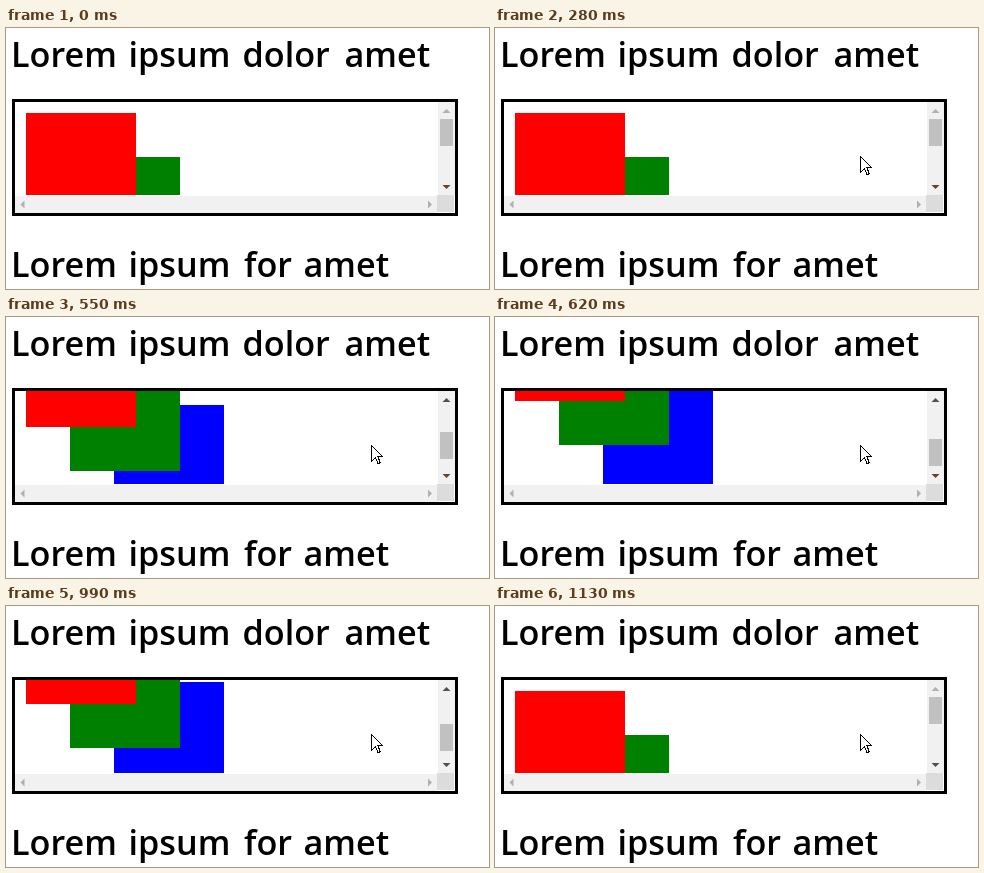
These frames come from a looping animation (483x261 px, 1.36 s). An HTML page:

```html
<!DOCTYPE html>
<html lang="en">
<head>
<meta charset="utf-8">
<style>
  html, body { margin: 0; width: 100%; height: 100%; overflow: hidden; background: #fff; }
  svg { display: block; }
  text { font: 600 34.2px "Open Sans", "Noto Sans", sans-serif; }
  .crisp { shape-rendering: crispEdges; }
</style>
</head>
<body>
<svg width="483" height="261" viewBox="0 0 483 261">
  <defs><clipPath id="view"><rect x="9" y="74" width="423" height="93"/></clipPath></defs>
  <text x="5" y="39">Lorem <tspan x="122.500">ipsum</tspan> <tspan x="236.500">dolor</tspan> <tspan x="338.500">amet</tspan></text>
  <text x="5" y="249">Lorem <tspan x="122.500">ipsum</tspan> <tspan x="238">for</tspan> <tspan x="297.500">amet</tspan></text>
  <g class="crisp">
    <g clip-path="url(#view)">
      <g id="content">
        <rect x="108" y="173" width="110" height="110" fill="blue"/>
        <rect x="64" y="129" width="110" height="110" fill="green"/>
        <rect x="20" y="85" width="110" height="110" fill="red"/>
      </g>
    </g>
    <path d="M432 74h17v93h-17zM9 168h422v17h-422z" fill="#f1f1f1"/>
    <rect x="431" y="167" width="17" height="17" fill="#dcdcdc"/>
    <rect id="thumb" x="434" y="91" width="13" height="27" fill="#c1c1c1"/>
    <rect x="7.5" y="72.5" width="443" height="114" fill="none" stroke="#000" stroke-width="3"/>
  </g>
  <path id="up" d="M436.5 85h8l-4-4z"/>
  <path id="down" d="M436.5 157h8l-4 4z"/>
  <path d="M18.500 172.500v8l-4-4zM422 172.500v8l4-4z" fill="#b0b0b0"/>
  <path id="cursor" class="crisp" d="M.5 .5V16.500L4.500 12.500L7 18.500H8.500L9 17.500L7 11.500H11.500Z" fill="#fff" stroke="#000"/>
</svg>
<script>
const LOOP = 1360, MAX_SCROLL = 116, THUMB_TRAVEL = 33;
// Each row: start time in ms, then the values held until the next row
const scrollSteps = [[0, 0], [490, 23], [550, 85], [620, 111], [690, 116], [990, 97], [1060, 30], [1130, 0]];
const cursorSteps = [[0, -50, -50], [70, 442, 224], [140, 402, 174], [210, 372, 137], [280, 365, 128]];

const $ = id => document.getElementById(id);
const held = (steps, t) => steps.findLast(step => step[0] <= t).slice(1);
const move = (id, x, y) => $(id).setAttribute('transform', `translate(${x} ${y})`);
const tint = (id, color) => $(id).setAttribute('fill', color);

function draw(now) {
  const t = now % LOOP;
  const [scroll] = held(scrollSteps, t);
  move('content', 0, -scroll);
  move('thumb', 0, Math.floor(scroll / MAX_SCROLL * THUMB_TRAVEL));
  move('cursor', ...held(cursorSteps, t));
  tint('up', scroll > 0 ? '#505050' : '#b0b0b0');
  tint('down', scroll === MAX_SCROLL ? '#a3a3a3' : t < 690 ? '#63452c' : '#505050');
}

const start = performance.now();
function tick() {
  draw(performance.now() - start);
  requestAnimationFrame(tick);
}
tick();
</script>
</body>
</html>
```
